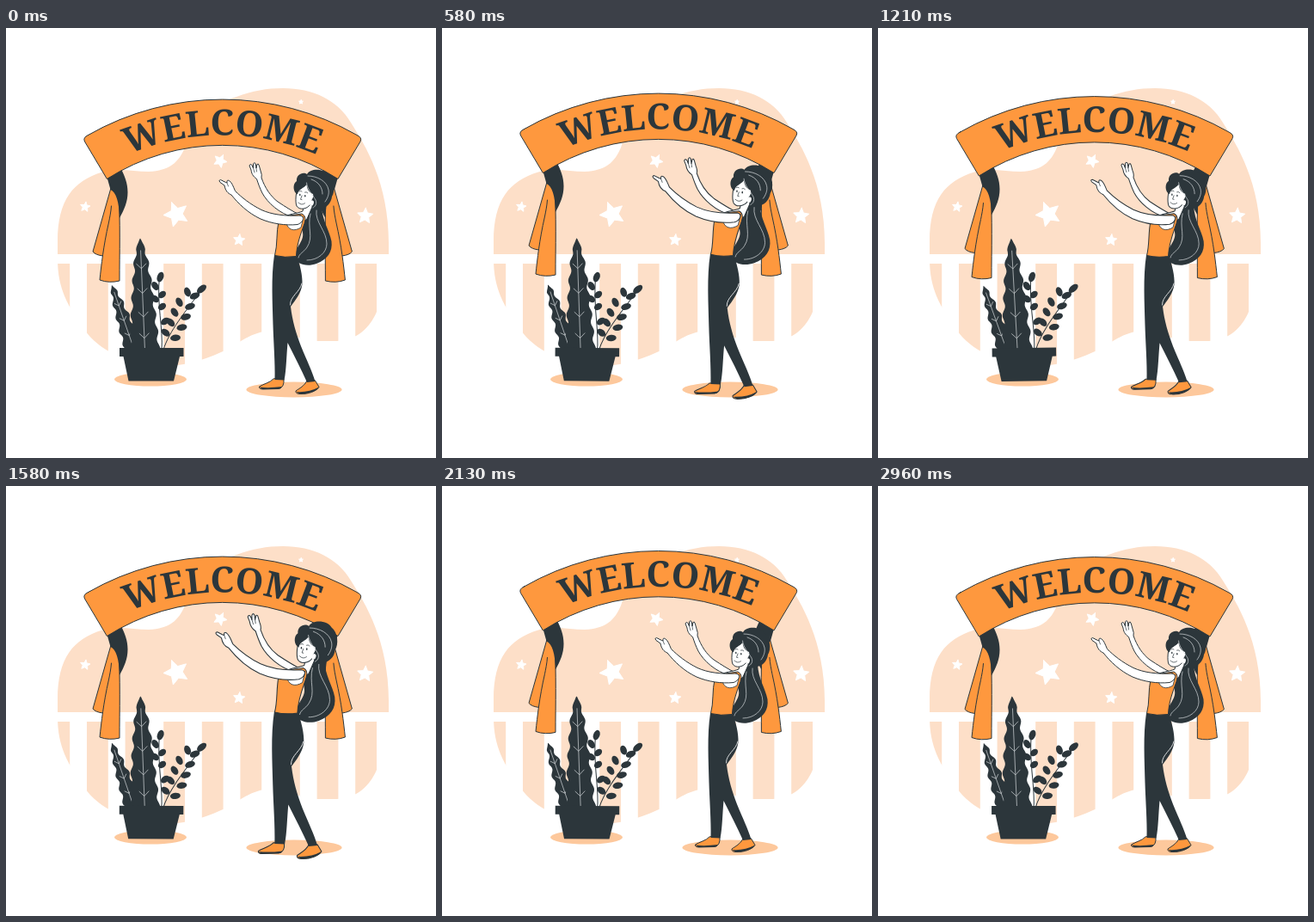
An HTML page with a canvas that plays this animation: 500 px wide and 500 px high, repeating every 3000 ms.

```html
<!DOCTYPE html>
<html lang="en">
<head>
<meta charset="utf-8">
<title>Welcome</title>
<style>
  html, body { margin: 0; width: 100%; height: 100%; overflow: hidden; background: #fff; }
  canvas { display: block; width: 500px; height: 500px; }
</style>
</head>
<body>
<canvas id="stage"></canvas>
<script>
const SIZE = 500, LOOP = 3000;
const ORANGE = '#fe983e', PALE = '#fddfc8', SHADE = '#fdc89c', DARK = '#2c363b', LIGHT = '#d5d9db';
const canvas = document.getElementById('stage');
const ctx = canvas.getContext('2d');
const ratio = Math.max(1, window.devicePixelRatio || 1);
canvas.width = canvas.height = SIZE * ratio;

function shape(d, fill, stroke, width = 1) {
  const p = new Path2D(d);
  if (fill) { ctx.fillStyle = fill; ctx.fill(p); }
  if (stroke) { ctx.strokeStyle = stroke; ctx.lineWidth = width; ctx.stroke(p); }
}

function oval(x, y, rx, ry, fill, turn = 0) {
  ctx.beginPath();
  ctx.ellipse(x, y, rx, ry, turn, 0, Math.PI * 2);
  ctx.fillStyle = fill;
  ctx.fill();
}

// Runs fn inside a transform about a fixed point.
function around(x, y, scale, degrees, fn) {
  ctx.save();
  ctx.translate(x, y);
  ctx.rotate(degrees * Math.PI / 180);
  ctx.scale(scale, scale);
  ctx.translate(-x, -y);
  fn();
  ctx.restore();
}

// Linear value between [time, value] stops.
function between(stops, t) {
  let i = 1;
  while (i < stops.length - 1 && t > stops[i][0]) i++;
  const [t0, a] = stops[i - 1], [t1, b] = stops[i];
  return a + (b - a) * (t - t0) / (t1 - t0);
}

// ---- backdrop ----
const CLOUD = 'M60 268 V248 C60 200 78 178 112 167.5 C130 162 148 167 166 167 ' +
  'C190 166 201 156 208 139 C217 112 236 90 268 80 C287 73 303 70 322 70 ' +
  'C357 70 386 84 401 110 C418 137 445 180 445 250 V263 ' +
  'C445 292 440 312 431 330 C424 347 408 364 384 364 H362 ' +
  'C340 363 322 350 300 353 C278 357 266 371 250 377 ' +
  'C224 389 196 395 172 393 C140 390 108 374 92 352 C72 323 60 304 60 268 Z';

function star(x, y, r, degrees) {
  ctx.beginPath();
  for (let i = 0; i < 10; i++) {
    const a = (i * 36 - 90 + degrees) * Math.PI / 180, d = i % 2 ? r * 0.48 : r;
    ctx.lineTo(x + d * Math.cos(a), y + d * Math.sin(a));
  }
  ctx.closePath();
  ctx.fillStyle = ctx.strokeStyle = '#fff';
  ctx.lineWidth = 1;
  ctx.fill();
  ctx.stroke();
}

function backdrop() {
  ctx.save();
  ctx.clip(new Path2D(CLOUD));
  ctx.fillStyle = PALE;
  ctx.fillRect(50, 60, 400, 203);
  for (let i = 0; i < 9; i++) ctx.fillRect(49.4 + i * 44.6, 274, 24.8, 130);
  ctx.restore();
  star(198, 216.5, 15, -22);
  star(92, 208, 6, 8);
  star(249, 154.5, 8, 26);
  star(271, 246.5, 7, 6);
  star(417.5, 218.5, 9.5, 4);
  star(343, 86, 2.6, 0);
  oval(168, 408.5, 42, 8, SHADE);
  oval(335, 420.5, 55.5, 9, SHADE);
}

// ---- banner ----
const MID = 251.7, HUB = 400;

function ribbon() {
  shape('M122 186 L101 260 Q104 264 113 265 L122 222 L130 190 Z', ORANGE, DARK);
  shape('M123 188 C123 205 122 214 119.5 226 C113 255 111 275 109 293 Q120 297 132 294 ' +
    'C132 262 133 225 131 190 Z', ORANGE);
  shape('M122.5 207 C122 214 120.5 221 119.5 226 C113 255 111 275 109 293 Q120 297 132 294 ' +
    'C132 262 133 225 131 190', null, DARK);
  shape('M117 172 L121.5 188 C128 191 131.5 202 132 221 C137.5 211 141.5 202 141.5 191 ' +
    'C141.5 180 138 172 133 162 Z', DARK);
}

function onArc(word, radius, size) {
  ctx.font = `bold ${size}px "Noto Serif", "Liberation Serif", serif`;
  ctx.fillStyle = DARK;
  ctx.textAlign = 'center';
  ctx.textBaseline = 'alphabetic';
  const widths = [...word].map(c => ctx.measureText(c).width);
  let run = -widths.reduce((a, b) => a + b, 0) / 2;
  [...word].forEach((c, i) => {
    ctx.save();
    ctx.translate(MID, HUB);
    ctx.rotate((run + widths[i] / 2) / radius);
    ctx.fillText(c, 0, -radius);
    ctx.restore();
    run += widths[i];
  });
}

function banner(lift) {
  ctx.save();
  ctx.translate(0, -lift);
  ribbon();
  ctx.save();
  ctx.translate(MID * 2, 0);
  ctx.scale(-1, 1);
  ribbon();
  ctx.restore();
  shape('M95.5 124.5 A315 315 0 0 1 408 124.5 Q414.5 127.5 412 132 L386 175.5 ' +
    'A250 250 0 0 0 117.4 175.5 L91.5 132 Q89 127.5 95.5 124.5 Z', ORANGE, DARK);
  onArc('WELCOME', 275.5, 41.5);
  ctx.restore();
}

// ---- plant ----
function wavyLeaf(x0, y0, x1, y1, half, waves, veins, arm) {
  const len = Math.hypot(x1 - x0, y1 - y0), ux = (x1 - x0) / len, uy = (y1 - y0) / len;
  const at = (t, off) => [x0 + ux * len * t - uy * off, y0 + uy * len * t + ux * off];
  ctx.beginPath();
  for (const side of [1, -1]) {
    for (let i = 0; i <= 90; i++) {
      const t = side > 0 ? i / 90 : 1 - i / 90;
      const wave = 1.4 * Math.min(1, t * 7) * Math.sin(t * waves * 2 * Math.PI - 1);
      ctx.lineTo(...at(t, side * (half * Math.sqrt(t) * Math.min(1, 0.5 + t * 5) + wave)));
    }
  }
  ctx.closePath();
  ctx.fillStyle = DARK;
  ctx.fill();
  ctx.beginPath();
  ctx.moveTo(...at(0.11, 0));
  ctx.lineTo(...at(1, 0));
  for (const t of veins) {
    const up = t - arm / len;
    ctx.moveTo(...at(up, -arm));
    ctx.lineTo(...at(t, 0));
    ctx.lineTo(...at(up, arm));
  }
  ctx.strokeStyle = LIGHT;
  ctx.lineWidth = 0.7;
  ctx.stroke();
}

function bud(x, y, degrees, long = 6) {
  oval(x, y, long, 3.7, DARK, degrees * Math.PI / 180);
}

function plant() {
  shape('M181 374 C183 350 175 322 178.5 288 M183 374 C190 352 207 332 230 301', null, DARK);
  bud(179.5, 289.5, -70);
  bud(173.5, 300, 55, 5.5);
  bud(181.5, 310, -40, 5);
  bud(173.5, 315, 40, 5);
  bud(181.5, 324, -35, 5);
  bud(185, 341, -35, 5.5);
  bud(227.5, 303.5, -40, 6.5);
  for (let i = 0; i < 5; i++) {
    bud([211, 201.5, 196, 191.5, 185.5][i], 307 + i * 11.8, 70 - i * 8, 5.6);
    bud([219.5, 214, 209, 204.5, 197][i], 311.5 + i * 12.2, -22 + i * 4, 6);
  }
  wavyLeaf(123, 299, 149, 374, 10.2, 5, [0.32, 0.55, 0.78], 4);
  wavyLeaf(156, 244.5, 161.5, 375, 16.6, 6.5, [0.27, 0.49, 0.7, 0.89], 5.5);
  shape('M132 372 H206.5 V382 H202 L195 410.5 H142.5 L136.5 382 H132 Z', DARK);
}

// ---- woman ----
function woman() {
  ctx.lineJoin = ctx.lineCap = 'round';
  // far arm
  shape('M334 220 C318 216 304 203 298 192 C295 186 293 180 291.5 175.5 ' +
    'C287 172.5 285.5 169 285 165 L283 160 Q284 157 286 159.5 L287.5 163 L287.5 158 ' +
    'Q289 155 290.3 158 L291 163 L292 158.5 Q293.5 157 294.3 160 L296 166 Q298 171 297 174 ' +
    'C301 186 308 196 316 202 C325 208 333 213 341 217 Z', '#fff', DARK);
  shape('M287.5 163 L289 168 M291 163 L291.5 167', null, DARK, 0.7);
  // long hair behind the back
  shape('M356 206 C346 217 343 228 345 238 C347 248 336 255 335.5 266 ' +
    'C337 275 350 278 361 274 C374 269 380 260 378.5 248 C376 235 368 225 367 207 Z', DARK);
  // neck and chest
  shape('M347 204 L345 213 C338 216 328 216 324 220 L340 230 L350 222 L357 206 Z', '#fff', DARK);
  // shoes
  shape('M311 408 C307 412.5 299 414 294.5 417 Q294 420 299 420 L317 419.5 Q324 418 323 408 Z', ORANGE, DARK);
  shape('M350 410 C347 416.5 341 419 337 422 Q336.5 425.5 342 425.5 C352 426 361 422 364 417.5 L359.5 410 Z', ORANGE, DARK);
  shape('M294.5 417.5 Q305 419 321 417 L319 419.5 L298 420 Z', DARK);
  shape('M337.5 423 Q352 424 364 417.5 Q361 424 342 426 Z', DARK);
  // trousers
  shape('M312 264 H338 C342 276 345 288 344.5 298 C343 309 336 317 331 324 ' +
    'C333 341 337 354 343 370 C350 387 356 399 359.5 411 L350 412 ' +
    'C343 396 335 381 327.5 366 C326 382 326 397 323.5 409.5 L312.5 409 ' +
    'C313 390 311 364 310.5 345 C310 320 308 290 312 264 Z', DARK);
  shape('M344 297 C342 307 330 312 330.5 322', null, '#fff', 0.8);
  // top
  shape('M317 225 Q320 219 326 218.5 L344 216 C350 219 348 225 345 233 C341 244 338 254 337.5 265.5 ' +
    'Q324 267.5 312.5 264.5 C316 252 314 238 317 225 Z', ORANGE, DARK);
  shape('M326 227 C328 235 335 237 343 232 L346 220 Z', '#fff', DARK, 0.8);
  // near arm
  shape('M342 218 C325 219 309 217 297 211.5 C284 205 274 197 266.5 189.5 ' +
    'C264 184 263 180 259.5 177.5 Q256.5 176 257 180 L255.5 179.5 L249.5 176.5 ' +
    'Q246.5 177 249 179.5 L254 183 C255 189 258 192.5 262 194 ' +
    'C270 204 281 215 296 222 C309 227.5 325 230 339 228.5 C346 226 348 219 342 218 Z', '#fff', DARK);
  shape('M257 180 L258.5 184', null, DARK, 0.7);
  // head
  shape('M340 182 C337 191 336 202 338 207 C341 212 350 211 354 205 L360 196 L354 180 Z', '#fff', DARK);
  oval(341.8, 194, 0.7, 1.3, DARK);
  oval(347.8, 195.3, 0.7, 1.3, DARK);
  shape('M341 190 Q342.5 188.7 344 190 M347.5 191 Q349.3 190 350.8 191.8 ' +
    'M344 195 L342.5 199.3 L344 199.6 M340 203 Q343.5 206.8 347.5 203.8', null, DARK, 0.7);
  shape('M339 193.5 C333.5 191 333 181 338 178 C337 170 346 166.5 350 170 ' +
    'C355 162 371 164 375 171.5 C382 177 383 190 379 196 C378 204 372 210 365 210 ' +
    'C360 211.5 356 210 355 206 C351 202 359 199 357 193 C352 191 350 187 349.5 182 ' +
    'C346 187 340 187 339 193.5 Z', DARK);
  oval(355.5, 203.5, 2.3, 3.2, '#fff', 0.3);
  shape('M349.5 180 C350.5 188 356 193 360 200 C362 205 359 208 357 209 ' +
    'M351 172 C362 172 373 178 375 188 C376 193 374 198 371 202 ' +
    'M355 176 C364 179 368 186 368 193', null, LIGHT, 0.7);
  shape('M361 212 C359 226 373 236 373 251 C373 261 363 270 350 270 ' +
    'M354 216 C350 232 358 243 350 255 C346 261 341 262 340 267', null, LIGHT, 0.7);
}

// ---- timing ----
const BEAT = [[0, 1], [300, 1.08], [900, 1], [1200, 1], [1500, 1.08], [1800, 1], [LOOP, 1]];
const SWAY = [[0, 0], [375, 1], [1125, -1], [1500, 0]];
const LIFT = [[0, 0], [750, 9], [1500, 0]];

function draw(now) {
  const t = now % LOOP, half = t % 1500;
  ctx.setTransform(ratio, 0, 0, ratio, 0, 0);
  ctx.fillStyle = '#fff';
  ctx.fillRect(0, 0, SIZE, SIZE);
  ctx.lineJoin = ctx.lineCap = 'round';
  backdrop();
  banner(between(LIFT, half));
  around(177, 328, 1, between(SWAY, half), plant);
  around(314, 291, between(BEAT, t), 0, woman);
}

let start = null;
function tick(now) {
  if (start === null) start = now;
  draw(now - start);
  requestAnimationFrame(tick);
}
draw(0);
requestAnimationFrame(tick);
</script>
</body>
</html>
```
